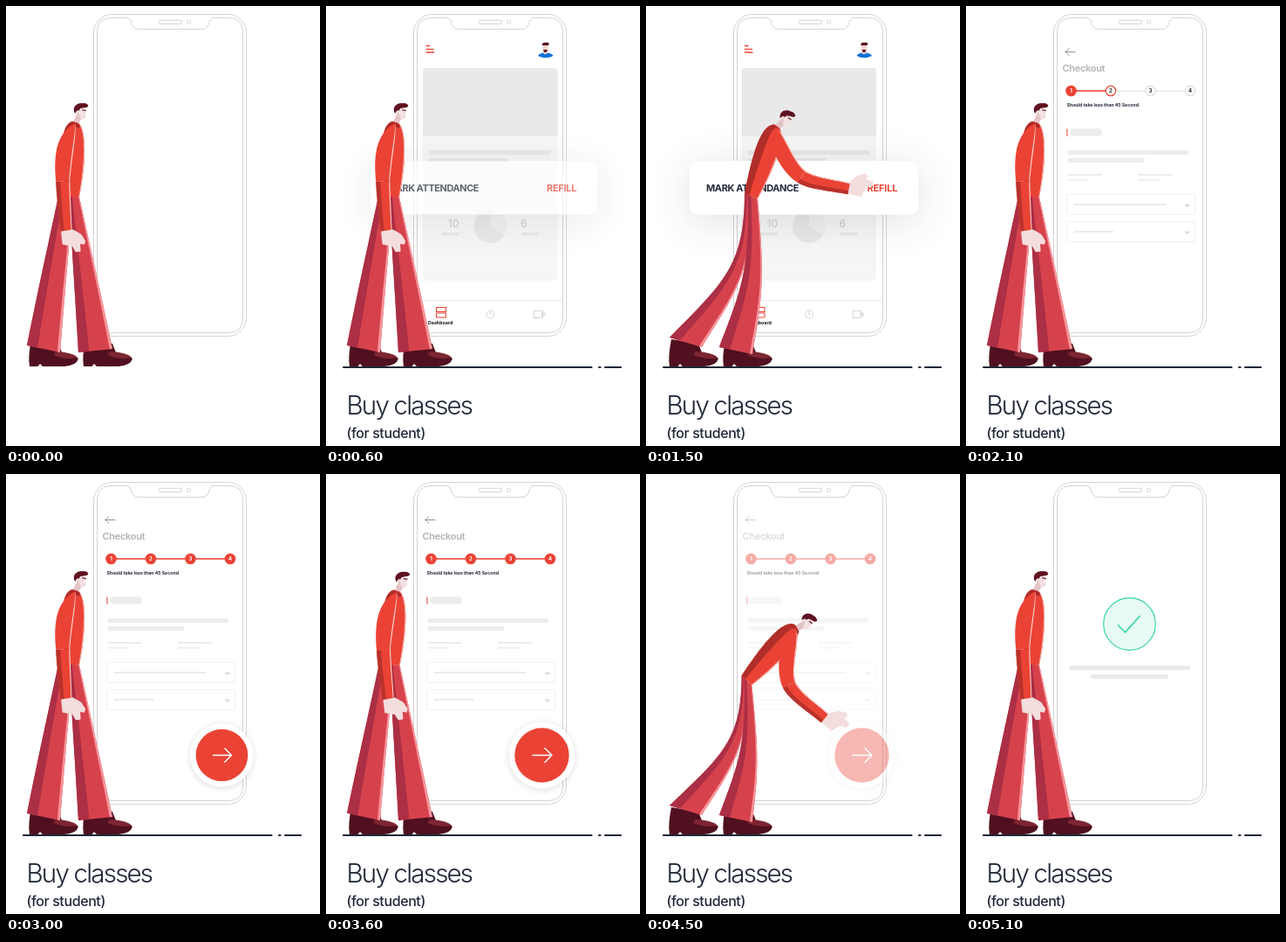
These frames come from a looping animation (360 px wide and 503 px high, 5.7 s). An HTML page:

```html
<!DOCTYPE html>
<html lang="en">
<head>
<meta charset="utf-8">
<title>Buy classes</title>
<style>
  html, body { margin: 0; width: 100%; height: 100%; overflow: hidden; background: #fff; }
  svg { display: block; width: 100vw; height: 100vh; }
  text { font-family: Inter, "Open Sans", sans-serif; }
  .line { fill: none; stroke: #c9c9c9; stroke-width: .8; }
  .red { stroke: #ea4335; fill: none; }
  .round { stroke-linecap: round; stroke-linejoin: round; }
</style>
</head>
<body>
<svg viewBox="0 0 360 503">
  <defs>
    <clipPath id="screen"><rect x="105" y="14" width="166" height="359" rx="17"/></clipPath>
    <filter id="soft" x="-30%" y="-130%" width="160%" height="360%"><feGaussianBlur stdDeviation="24"/></filter>
    <filter id="glow" x="-30%" y="-30%" width="160%" height="160%"><feGaussianBlur stdDeviation="4"/></filter>
    <g id="shoe">
      <path fill="#50101f" d="M29 381Q25 401 27 412H36.5L39 409L42 412H67Q81 411 83 403Q78 398 64 396L60 386Z"/>
      <path fill="#7d2632" d="M57 395Q77 396 82 402Q70 405 54 399Z"/>
    </g>
  </defs>

  <g class="line">
    <rect x="100.5" y="9.5" width="175" height="368" rx="21"/>
    <path d="M121 13.5H138Q142.5 13.5 143 17Q144.5 26.5 153 26.5H224Q232 26.5 233.5 17Q234 13.5 238 13.5H255Q271.5 13.5 271.5 30V357Q271.5 373.5 255 373.5H121Q104.5 373.5 104.5 357V30Q104.5 13.5 121 13.5Z"/>
    <rect x="175" y="16.3" width="27" height="4.2" rx="2.1"/>
    <circle cx="209.5" cy="18.4" r="2.2"/>
  </g>

  <g clip-path="url(#screen)">
    <g id="dash">
      <path class="red" stroke-width="1.3" d="M114.5 45.5h4.5M114.5 49.3h9M114.5 53h9.5"/>
      <path fill="#1472d8" d="M243 57Q244 54.5 249 53.5H254Q259.500 54.500 260.500 57Q252 61.500 243 57Z"/>
      <path fill="#f3d3cc" d="M248.500 44h6v6l-1.500 5h-3l-1.500-5z"/>
      <path fill="#5c1322" d="M247.800 45Q247.500 41.800 251 41.800H255Q256 43 255.300 45H248.500ZM249.300 50h4.400q0 3-2.200 3t-2.200-3z"/>
      <rect x="111" y="71" width="154.5" height="243" rx="4" fill="#f6f6f6"/>
      <path fill="#e9e9e9" d="M111 149V75q0-4 4-4h146.5q4 0 4 4v74z"/>
      <g fill="#e8e8e8">
        <rect x="118" y="165" width="140" height="5" rx="1"/>
        <rect x="118" y="174" width="90" height="5" rx="1"/>
        <rect x="133" y="259" width="19.5" height="3.5" rx="1"/>
        <rect x="224.5" y="259" width="20" height="3.5" rx="1"/>
        <circle cx="188.5" cy="252" r="19"/>
      </g>
      <path fill="#f0f0f0" d="M188.5 252V233a19 19 0 0 1 16 29z"/>
      <g fill="#c9c9c9" font-size="12"><text x="140" y="253">10</text><text x="223" y="253">6</text></g>
      <path d="M104 336.5h168" stroke="#ececec"/>
      <g class="red" stroke-width="1"><rect x="126.5" y="344.5" width="11" height="5"/><rect x="126.5" y="351" width="11" height="5"/></g>
      <text x="117" y="363.5" font-size="5.3" font-weight="700" fill="#111">Dashboard</text>
      <g class="line"><circle cx="188.5" cy="352.5" r="4.5"/><path d="M188.5 349.5v3.2h2.3M238.5 348.5h10v8h-10zM248.5 351h2.5v3h-4v-3z"/></g>
    </g>
    <g id="checkout">
      <path class="line round" style="stroke:#777" d="M125 52.5H114M118 48.5l-4 4l4 4"/>
      <text x="110.5" y="74.5" font-size="11" font-weight="600" letter-spacing="-.3" fill="#b3b3b3">Checkout</text>
      <path d="M120.5 97H257" stroke="#dedede" stroke-width="1.2"/>
      <path id="track" class="red" stroke-width="1.3"/>
      <g id="steps" font-size="6" font-weight="700" text-anchor="middle"></g>
      <text x="115.5" y="114.8" font-size="5.2" font-weight="700" fill="#1d2433">Should take less than 45 Second</text>
      <rect x="115.3" y="140.5" width="1.3" height="8.5" fill="#ea6a60"/>
      <g fill="#ececec">
        <rect x="119.5" y="140.3" width="36.5" height="8.5" rx="4.2"/>
        <rect x="116.5" y="165" width="138.5" height="5" rx="1"/>
        <rect x="116.5" y="174" width="88" height="5" rx="1"/>
        <path d="M117 192h39v2h-39zM197 192h39v2h-39zM117 198h24v1.5h-24zM197 198h24v1.5h-24zM124 226h105v2h-105zM124 257h45v2h-45z"/>
      </g>
      <g fill="none" stroke="#f0f0f0"><rect x="115.5" y="215.5" width="147" height="23" rx="2"/><rect x="115.5" y="246.5" width="147" height="23" rx="2"/></g>
      <path class="line" style="stroke:#999" d="M251.5 226.8l2.3 2l2.3-2M251.5 257.6l2.3 2l2.3-2"/>
    </g>
    <g id="done">
      <g id="badge">
        <circle cx="187.5" cy="171.5" r="29.8" fill="#e8faf4" stroke="#35d6a4" stroke-width="1.2"/>
        <path id="check" fill="none" stroke="#35d6a4" stroke-width="1.7" pathLength="1" stroke-dasharray="1 2" d="M174 172.5L182.5 181L199.5 162"/>
      </g>
      <g id="lines" fill="#eaeaea"><rect x="118.5" y="219" width="138.5" height="5" rx="1"/><rect x="143.5" y="229" width="88" height="5" rx="1"/></g>
    </g>
  </g>

  <g id="card">
    <rect x="50" y="184" width="262" height="62" rx="10" fill="#28303a" opacity=".14" filter="url(#soft)"/>
    <rect x="50" y="177" width="262" height="61.5" rx="8" fill="#fff"/>
    <g font-size="11" font-weight="700" letter-spacing="-.4">
      <text x="69" y="211.7" fill="#232b3a">MARK ATTENDANCE</text>
      <text x="253.5" y="211.7" letter-spacing="-.2" fill="#ea4335">REFILL</text>
    </g>
    <circle id="tap" cx="271" cy="208.5" r="11" fill="#ea4335" opacity=".2"/>
  </g>

  <g id="button">
    <circle cx="247.5" cy="323" r="38" fill="#000" opacity=".13" filter="url(#glow)"/>
    <circle cx="247.5" cy="321.5" r="38" fill="#fff"/>
    <circle cx="247.5" cy="321.5" r="31.2" fill="#ea4335"/>
    <path class="round" fill="none" stroke="#fff" stroke-width="1.5" d="M237 321.5h22M251 313.5l8 8l-8 8"/>
  </g>

  <g stroke="#1d2836" stroke-width="2.2" stroke-linecap="round"><path id="floor"/><path id="dots" d="M313 413h1.5M320 413h18"/></g>
  <g id="title" fill="#1f2737">
    <text x="23.5" y="466.5" font-size="29.5" font-weight="300" letter-spacing="-1.8">Buy classes</text>
    <text x="23.5" y="493.5" font-size="16" font-weight="500" letter-spacing="-.4">(for student)</text>
  </g>

  <use href="#shoe"/><use href="#shoe" x="62"/>
  <g id="man"></g>
</svg>

<script>
const LOOP = 5700, STEP = 150, NS = 'http://www.w3.org/2000/svg';
const $ = id => document.getElementById(id);
const set = (el, o) => { for (const k in o) el.setAttribute(k, o[k]); return el; };
const add = (parent, tag, o) => parent.appendChild(set(document.createElementNS(NS, tag), o));
const mix = (a, b, k) => a + (b - a) * k;
const seg = (t, a, b) => Math.min(1, Math.max(0, (t - a) / (b - a)));
const inOut = n => x => x < .5 ? (2 * x) ** n / 2 : 1 - (2 - 2 * x) ** n / 2;
const linear = x => x, soft = inOut(2), firm = inOut(3), sharp = inOut(4);
const out = x => 1 - (1 - x) ** 3;
const back = x => 1 + 2.2 * (x - 1) ** 3 + 1.2 * (x - 1) ** 2;

// Points are [x, y].
const mixPt = (p, q, k) => p.map((v, i) => mix(v, q[i], k));
const go = (p, d, k, n = [0, 0], m = 0) => [p[0] + d[0] * k + n[0] * m, p[1] + d[1] * k + n[1] * m];
const dist = (p, q) => Math.hypot(q[0] - p[0], q[1] - p[1]);
const unit = (p, q) => { const d = dist(p, q) || 1; return [(q[0] - p[0]) / d, (q[1] - p[1]) / d]; };
const front = d => [d[1], -d[0]];

// The whole figure follows from three joints.
const poses = {
  stand: { neck: [79, 132], waist: [76, 218], wrist: [69, 257] },
  lean: { neck: [130, 135], waist: [110, 218], wrist: [186, 236] },
  reach: { neck: [150, 136.5], waist: [120.5, 217.5], wrist: [233, 209] },
  press: { neck: [179, 177], waist: [118, 237], wrist: [214, 281] }
};
const moves = [
  [600, 900, 'stand', 'lean', soft],
  [900, 1050, 'lean', 'reach', linear],
  [1500, 1760, 'reach', 'lean', soft],
  [1760, 2100, 'lean', 'stand', out],
  [3480, 4050, 'stand', 'press', sharp],
  [4310, 5080, 'press', 'stand', firm]
];

// Bands across each limb, from back edge 0 to front edge 1.
const shirt = '#ea4335', pants = '#d6424c';
const legBands = [[0, 1, pants], [0, .32, '#ab2f45'], [.92, 1, '#f7949a']];
const limbs = {
  legA: legBands,
  legB: legBands,
  torso: [[0, 1, shirt], [0, .36, '#b02e29'], [.96, 1, '#f9b9b0']],
  upper: [[0, 1, shirt], [.94, 1, '#fbd8d3']],
  fore: [[0, 1, shirt], [0, .32, '#b9322b'], [.93, 1, '#fbd8d3']]
};

const man = $('man'), bands = [], heads = [];
const headPart = (fill, d) => add(heads[heads.length - 1], 'path', { fill, d });
for (const part in limbs) {
  if (part === 'torso') {
    heads.push(add(man, 'g', {}));
    headPart('#e3c3c6', 'M-4 6L1-7L8-4L5 1L5 7Z');
    headPart('#f4e0e1', 'M2-15H12L12.5-6Q11-2 7-3L3-6Z');
    headPart('#e3c3c6', 'M2-12L5-8L6-3L2-6Z');
    headPart('#5f1221', 'M0-9Q-3-14 0-18Q4-22 8-21Q12-22 15-19Q15-16 11-16L6-15L4-12L3-13L1-11ZM8-14L12.500-13.300V-12L8-12.800Z');
  }
  for (const [a, b, fill] of limbs[part]) bands.push({ part, a, b, el: add(man, 'path', { fill }) });
  if (part === 'torso') {
    heads.push(add(man, 'g', {}));
    headPart('#a82b2b', 'M-4 4L0 1L6 4L5 8Z');
  }
}
const hand = add(man, 'path', {
  fill: '#f3dddd', stroke: '#f3dddd', 'stroke-width': 2, 'stroke-linejoin': 'round',
  d: 'M-3 4L6-5L16-6L24-3L25 0L20 2L26 9L23 12L16 9L6 14Z'
});

function band([L, R], a, b) {
  const p = L.map((q, i) => mixPt(q, R[i], a));
  const q = L.map((o, i) => mixPt(o, R[i], b)).reverse();
  return `M${p[0]}C${p.slice(1).join(' ')}L${q[0]}C${q.slice(1).join(' ')}Z`;
}

// A trouser edge is straight when upright; when leaning it drops first, then sweeps to the hem.
function trouser(p, q, lean, bulge) {
  const at = (x, y) => [mix(p[0], q[0], x) + bulge * lean, mix(p[1], q[1], y)];
  return [p, at(mix(.3, 0, lean), mix(.3, .5, lean)), at(mix(.68, .28, lean), mix(.66, .62, lean)), q];
}

function bendArm(shoulder, wrist) {
  const a = 52, b = 56.5, d = Math.min(dist(shoulder, wrist), a + b - .1);
  const along = (d * d + a * a - b * b) / (2 * d);
  const u = unit(shoulder, wrist);
  return go(shoulder, u, along, front(u), -Math.sqrt(Math.max(0, a * a - along * along)));
}

function figure({ neck, waist, wrist }) {
  const lean = seg(waist[0], 76, 112);
  const down = unit(neck, waist), n = front(down), len = dist(neck, waist);
  const spine = (k, w) => go(neck, down, len * k, n, w);
  const hip = w => spine(1, w);

  const shoulder = go(neck, down, 17, n, mix(-12, 3, lean));
  const elbow = bendArm(shoulder, wrist);
  const u = unit(shoulder, elbow), f = unit(elbow, wrist), b = unit([0, 0], go(u, f, 1));
  const upper = s => [
    go(neck, down, 3, n, s), go(shoulder, u, 0, front(u), 14 * s),
    go(elbow, b, -16, front(b), 9 * s), go(elbow, b, 0, front(b), 8 * s)
  ];
  const fore = s => [
    go(elbow, b, 0, front(b), 8 * s), go(elbow, b, 15, front(b), 8 * s),
    go(wrist, f, -16, front(f), 7 * s), go(wrist, f, 0, front(f), 6.5 * s)
  ];
  const tilt = Math.atan2(-down[0], down[1]) * 180 / Math.PI;
  return {
    legA: [
      trouser(hip(mix(-16, -8, lean)), [24 + 3 * lean, 388 - 9 * lean], lean, 0),
      trouser(hip(1), [62 + 2 * lean, 396 - 6 * lean], lean, 0)
    ],
    legB: [
      trouser(hip(-4), [83 + lean, 396 - 6 * lean], lean, 2),
      trouser(hip(8), [122, 392 + 6 * lean], lean, 8)
    ],
    torso: [
      [spine(0, -3), spine(.05, -18), spine(.5, -15), hip(-8)],
      [spine(.02, 4), spine(.12, 15), spine(.6, 14), hip(8)]
    ],
    upper: [upper(-1), upper(1)],
    fore: [fore(-1), fore(1)],
    head: tilt / 2 + 14 * lean,
    hand: Math.atan2(f[1], f[0]) * 180 / Math.PI - 50
  };
}

function drawMan(t) {
  const now = moves.filter(m => t >= m[0]).pop() || moves[0];
  const [start, end, from, to, ease] = now, k = ease(seg(t, start, end));
  const joints = {};
  for (const j in poses[from]) joints[j] = mixPt(poses[from][j], poses[to][j], k);
  const body = figure(joints);
  for (const s of bands) set(s.el, { d: band(body[s.part], s.a, s.b) });
  for (const h of heads) set(h, { transform: `translate(${joints.neck}) rotate(${body.head})` });
  set(hand, { transform: `translate(${joints.wrist}) rotate(${body.hand})` });
}

const GAP = 45.5, stepX = i => 120.5 + GAP * i;
const steps = [0, 1, 2, 3].map(i => {
  const dot = add($('steps'), 'circle', { cx: stepX(i), cy: 97, r: 5.7, 'stroke-width': 1.2 });
  const label = add($('steps'), 'text', { x: stepX(i), y: 99.2 });
  label.textContent = i + 1;
  return { dot, label };
});

function drawSteps(t) {
  const p = 1 + 2 * seg(t, 2300, 2950);
  set($('track'), { d: `M${stepX(0)} 97H${stepX(p)}` });
  steps.forEach(({ dot, label }, i) => {
    const full = p > i || t >= 3000, on = p >= i;
    set(dot, { fill: full ? '#ea4335' : '#fff', stroke: on ? '#ea4335' : '#dedede' });
    set(label, { fill: full ? '#fff' : '#222' });
  });
}

const fade = (id, v) => set($(id), { opacity: v, visibility: v > 0 ? 'visible' : 'hidden' });
const shift = (id, x, y) => set($(id), { transform: `translate(${x} ${y})` });
const scale = (id, x, y, s) => set($(id), { transform: `translate(${x} ${y}) scale(${s}) translate(${-x} ${-y})` });

function draw(t) {
  const slide = firm(seg(t, 1410, 2100)) * 168;
  fade('dash', t < 2100 ? seg(t, 50, 450) : 0);
  shift('dash', -slide, 0);
  fade('checkout', t < 1500 ? 0 : 1 - seg(t, 4250, 4700));
  shift('checkout', 168 - slide, 0);
  drawSteps(t);

  fade('card', seg(t, 350, 700) * (1 - seg(t, 1500, 1900)));
  scale('card', 181, 208, mix(.85, 1, out(seg(t, 350, 750))));
  set($('tap'), { visibility: t >= 1050 && t < 1200 ? 'inherit' : 'hidden' });

  fade('button', seg(t, 2800, 2950) * (1 - seg(t, 4250, 4650)));
  scale('button', 247.5, 321.5, Math.max(0, back(seg(t, 2800, 3300))));

  fade('badge', seg(t, 4500, 4800));
  scale('badge', 187.5, 171.5, mix(.5, 1, out(seg(t, 4500, 4950))));
  fade('check', seg(t, 4650, 4700));
  set($('check'), { 'stroke-dashoffset': 1 - seg(t, 4650, 5100) });
  fade('lines', seg(t, 4650, 5050));

  fade('floor', t >= STEP ? 1 : 0);
  set($('floor'), { d: `M20 413H${mix(20, 304.5, out(seg(t, 50, 600)))}` });
  fade('dots', seg(t, 450, 600));
  const rise = out(seg(t, 150, 700));
  fade('title', rise);
  shift('title', 0, 8 * (1 - rise));

  drawMan(t);
}

function loop() {
  const t = performance.now() % LOOP;
  draw(Math.floor(t / STEP) * STEP);
  requestAnimationFrame(loop);
}
loop();
</script>
</body>
</html>
```
